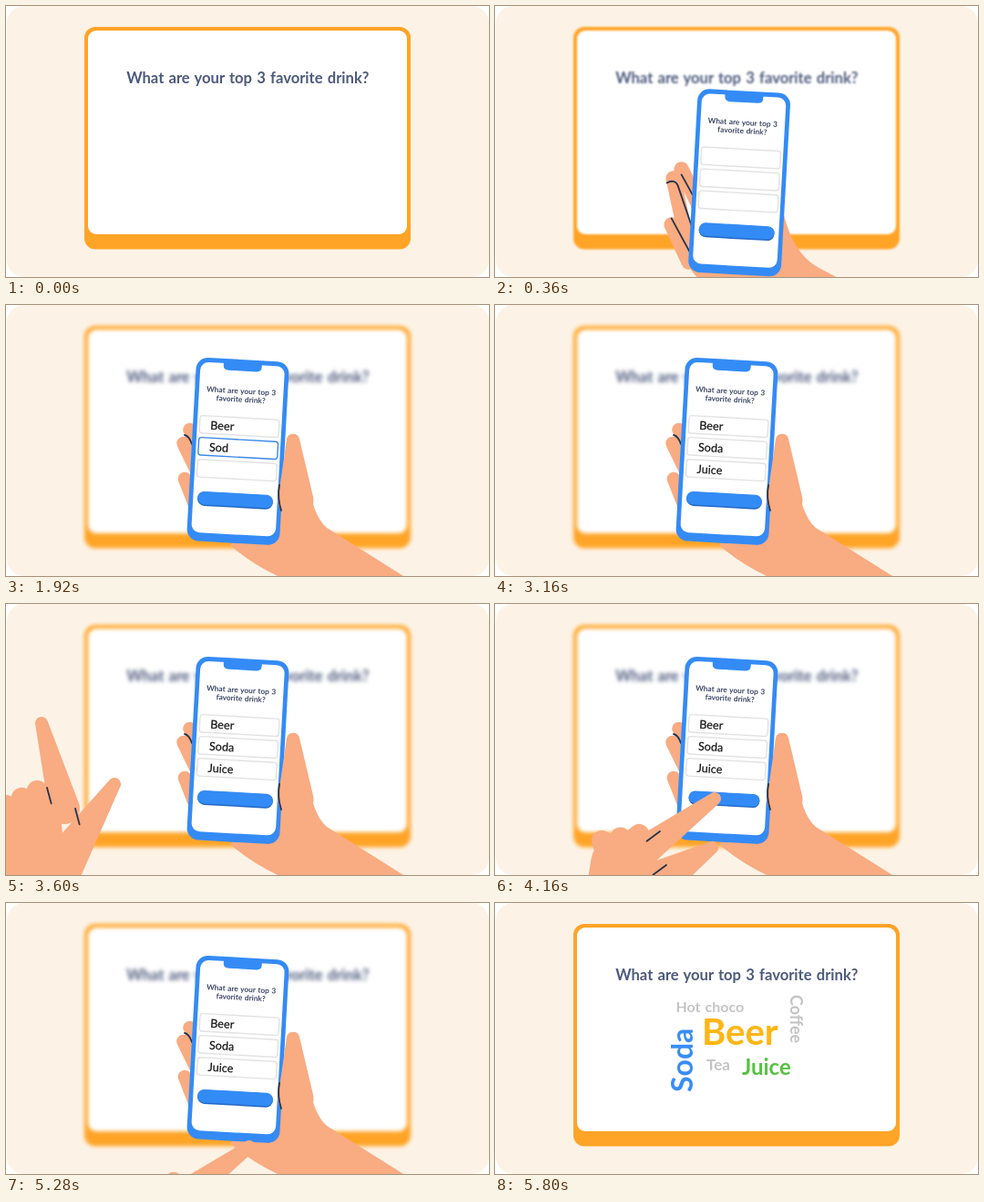
Animation of 530 by 298 pixels, one loop 7.12 s. Source, as an HTML page:

```html
<!DOCTYPE html>
<html lang="en">
<head>
<meta charset="utf-8">
<title>Favorite drink poll</title>
<style>
html, body { margin: 0; width: 100%; height: 100%; overflow: hidden; background: #fff; }
svg { display: block; width: 100vw; height: 100vh; }
text { font-family: Lato, "Open Sans", sans-serif; font-weight: 700; word-spacing: .07em; }
.mid { text-anchor: middle; }
.title { font-size: 16.6px; fill: #4d5a7c; }
.ask { font-size: 8.3px; fill: #3d4766; }
.typed { font-size: 12.7px; font-weight: 400; fill: #111; stroke: #111; stroke-width: .2; }
.skin { fill: #f9ab82; }
.crease { fill: none; stroke: #24344a; stroke-width: 1.8; stroke-linecap: round; }
.field { fill: #fff; stroke: #e2e2e2; stroke-width: 1.4; }
.field.active { stroke: #3a88e6; }
.gray { fill: #c4c4c4; }
</style>
</head>
<body>
<svg viewBox="0 0 530 298">
  <rect x="1" width="529" height="298" rx="19" fill="#fcf3e6"/>
  <g id="card">
    <rect x="86" y="23" width="358" height="244.5" rx="12" fill="#ffa427"/>
    <rect x="90" y="27" width="350" height="224" rx="9" fill="#fff"/>
    <text class="title mid" x="265.3" y="85">What are your top 3 favorite drink?</text>
  </g>
  <g id="cloud">
    <text class="gray" x="198.5" y="120" font-size="16">Hot choco</text>
    <text x="227" y="156" font-size="40" fill="#fdb614">Beer</text>
    <text class="gray" transform="translate(323.5 101) rotate(90)" font-size="18">Coffee</text>
    <text transform="translate(217 208) rotate(-90)" font-size="32" fill="#3a8df5">Soda</text>
    <text class="gray" x="232" y="184" font-size="17">Tea</text>
    <text x="271" y="188.5" font-size="24" fill="#55c242">Juice</text>
  </g>
  <g id="holder">
    <path id="fingers" class="skin"/>
    <path id="openCreases" class="crease" d="M175 161C180 158 185 159 187 164L202 208M191 152L203 174M180 200L200 237"/>
    <path id="gripCrease" class="crease" d="M196 143Q201 144 204 153"/>
    <path id="palm" class="skin"/>
    <g transform="translate(254.5 160.9) rotate(3.2)">
      <rect x="-51" y="-101" width="102" height="202" rx="13" fill="#348bf5"/>
      <rect x="-46.3" y="-96" width="92.6" height="187.5" rx="9" fill="#fff"/>
      <path d="M-21 -97H21V-94Q21 -88.5 15 -88.5H-15Q-21 -88.5 -21 -94Z" fill="#348bf5"/>
      <text class="ask mid" y="-63.5">What are your top 3</text>
      <text class="ask mid" y="-54.3">favorite drink?</text>
      <g id="fields"></g>
      <g id="button">
        <rect x="-41.5" y="46.5" width="83" height="15.5" rx="7.7" fill="#2268c4"/>
        <rect x="-41.5" y="46" width="83" height="14.5" rx="7.2" fill="#338bf5"/>
      </g>
    </g>
    <g id="thumb">
      <path id="thumbShape" class="skin"/>
      <path class="crease" d="M300 198Q297.5 212 302 226"/>
    </g>
    <g id="pointer">
      <path id="pointerShape" class="skin"/>
      <path id="pointerCreases" class="crease"/>
    </g>
  </g>
</svg>
<script>
const LOOP = 7120;
const $ = id => document.getElementById(id);
const set = (id, name, value) => $(id).setAttribute(name, value);
const span = (t, from, to) => Math.min(1, Math.max(0, (t - from) / (to - from)));
const smooth = (t, from, to) => { const k = span(t, from, to); return k * k * (3 - 2 * k); };
const easeOut = (t, from, to) => 1 - (1 - span(t, from, to)) ** 3;
const easeIn = (t, from, to) => span(t, from, to) ** 2;
const mix = (a, b, k) => a + (b - a) * k;
const mixPoint = (a, b, k) => [mix(a[0], b[0], k), mix(a[1], b[1], k)];

// Blends two poses, each a set of named points
const mixPose = (a, b, k) =>
  Object.fromEntries(Object.keys(a).map(name => [name, mixPoint(a[name], b[name], k)]));

// Outline around two circles: a tapered limb with round ends
function limb(a, ra, b, rb) {
  const angle = Math.atan2(b[1] - a[1], b[0] - a[0]);
  const open = Math.acos((ra - rb) / Math.hypot(b[0] - a[0], b[1] - a[1]));
  const on = (c, r, side) =>
    [c[0] + r * Math.cos(angle + side * open), c[1] + r * Math.sin(angle + side * open)];
  return `M${on(a, ra, 1)}A${ra} ${ra} 0 ${+(ra > rb)} 1 ${on(a, ra, -1)}` +
    `L${on(b, rb, -1)}A${rb} ${rb} 0 ${+(rb > ra)} 1 ${on(b, rb, 1)}Z`;
}

function add(parent, tag, attrs) {
  const node = document.createElementNS("http://www.w3.org/2000/svg", tag);
  for (const name in attrs) node.setAttribute(name, attrs[name]);
  return parent.appendChild(node);
}

const CHAR_MS = 110, TYPING_DELAY = 80;
const answers = [
  { word: "Beer", from: 1160, to: 1620 },
  { word: "Soda", from: 1620, to: 2200 },
  { word: "Juice", from: 2200, to: 2800 },
];
answers.forEach((answer, i) => {
  const y = -27.4 + 24.1 * i;
  answer.box = add($("fields"), "rect", { x: -43.5, y: y - 9.7, width: 87, height: 19.4, rx: 3 });
  answer.label = add($("fields"), "text", { class: "typed", x: -31.8, y: y + 4.9 });
});

const openHand = {
  tip1: [191, 146], base1: [212, 190],
  tip2: [182, 156], base2: [197, 225],
  tip3: [180, 207], base3: [199, 248],
  side: [302, 190], bend: [312, 238], wrist: [341, 254], elbow: [730, 461],
  heel: [252, 298], palm: [200, 255],
};
const grippingHand = {
  tip1: [201.5, 137], base1: [213, 160],
  tip2: [194.5, 152], base2: [210, 184],
  tip3: [196, 191], base3: [212, 232],
  side: [330, 185], bend: [336, 232], wrist: [352, 245], elbow: [785, 518],
  heel: [298, 298], palm: [246, 264],
};
set("thumbShape", "d", limb([315, 149], 7.2, [318, 215], 19.5));

const raisedHand = {
  tip: [39, 131], base: [64, 225], thumb: [119, 198], thumbBase: [60, 290],
  firstKnuckle: [34, 205], lastKnuckle: [0, 221], palm: [28, 245], arm: [20, 420],
  crease: [45, 202], thumbCrease: [76, 225],
};
const tappingHand = {
  tip: [241, 214], base: [163, 272], thumb: [238, 268], thumbBase: [170, 310],
  firstKnuckle: [158, 253], lastKnuckle: [117, 260], palm: [138, 286], arm: [140, 450],
  crease: [181, 250], thumbCrease: [188, 287],
};

function drawHolder(t) {
  const away = 1 - easeOut(t, 40, 680);
  const leave = easeIn(t, 5340, 5720);
  set("holder", "transform", `translate(${110 * away} ${270 * (away + leave)})`);

  const grip = smooth(t, 760, 1500);
  const h = mixPose(openHand, grippingHand, grip);
  const r = mix(8.2, 7.3, grip);
  set("fingers", "d", [1, 2, 3].map(i => limb(h["tip" + i], r, h["base" + i], r)).join(""));
  set("palm", "d", `M${h.side}Q${h.bend} ${h.wrist}L${h.elbow}L560 470L${h.heel}` +
    `Q${h.palm[0] + 22} ${h.heel[1] - 14} ${h.palm}Z`);
  set("openCreases", "transform", `translate(${14 * grip} ${-8 * grip})`);
  set("openCreases", "opacity", 1 - span(grip, 0, 0.7));
  set("gripCrease", "opacity", span(grip, 0.7, 1));
  set("thumb", "transform", `translate(330 240) scale(${grip}) translate(-330 -240)`);
}

function drawPhone(t) {
  for (const { word, from, to, box, label } of answers) {
    const typed = Math.floor((t - from - TYPING_DELAY) / CHAR_MS) + 1;
    label.textContent = word.slice(0, Math.max(0, typed));
    box.setAttribute("class", t >= from && t < to ? "field active" : "field");
  }
  const press = smooth(t, 4040, 4140) - smooth(t, 4200, 4320);
  set("button", "transform", `translate(0 54) scale(${1 - 0.06 * press}) translate(0 -54)`);
}

function drawPointer(t) {
  const below = 1 - easeOut(t, 3160, 3560);
  const turn = smooth(t, 3600, 3800);
  const hover = turn - smooth(t, 3880, 4100) + smooth(t, 4200, 4480);
  const lift = smooth(t, 4600, 4780);
  const leave = smooth(t, 4780, 5280);
  const dx = -70 * below + 4 * hover - 12 * lift + 34 * leave;
  const dy = 190 * below - 14 * hover - 26 * lift + 94 * leave - 75 * Math.sin(Math.PI * turn);
  set("pointer", "transform", `translate(${dx} ${dy})`);

  const h = mixPose(raisedHand, tappingHand, turn);
  const knuckles = [0, 0.5, 1].map(k => limb(mixPoint(h.firstKnuckle, h.lastKnuckle, k), 11, h.palm, 24));
  set("pointerShape", "d", limb(h.tip, 7, h.base, 17) + limb(h.thumb, 7, h.thumbBase, 24) +
    limb(h.palm, 33, h.arm, 60) + knuckles.join(""));

  const angle = Math.atan2(h.base[1] - h.tip[1], h.base[0] - h.tip[0]);
  const stroke = ([x, y]) => `M${x} ${y}l${18 * Math.cos(angle)} ${18 * Math.sin(angle)}`;
  set("pointerCreases", "d", stroke(h.crease) + stroke(h.thumbCrease));
}

function draw(t) {
  const blur = 2.2 * (span(t, 40, 640) - span(t, 5340, 5720));
  $("card").style.filter = blur > 0 ? `blur(${blur}px)` : "none";
  const pop = easeOut(t, 5480, 5800);
  set("cloud", "transform", `translate(264 155) scale(${pop}) translate(-264 -155)`);
  drawHolder(t);
  drawPhone(t);
  drawPointer(t);
}

const begin = performance.now();
function frame() {
  draw((performance.now() - begin) % LOOP);
  requestAnimationFrame(frame);
}
frame();
</script>
</body>
</html>
```
